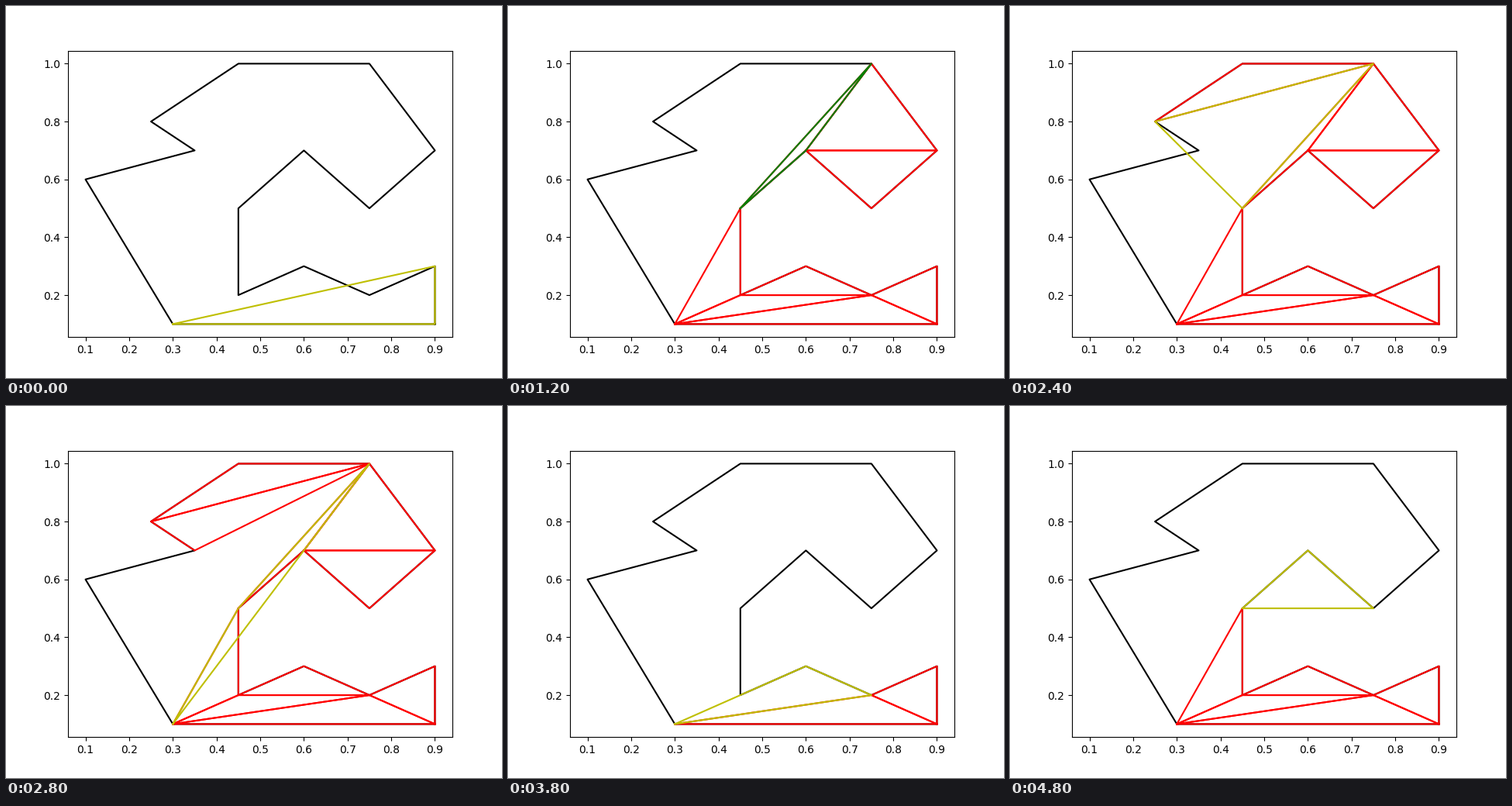
Animation, 640 px wide and 480 px high, one loop 5 s. Source, as a matplotlib script:

```python
import matplotlib.pyplot as plt
from matplotlib.animation import FuncAnimation

EPS = 1e-9


def make_outline():
    """Two zigzag jaws, closed by a few points along the top and left."""
    lower = [(.9 - .15 * i, .3 - .1 * (i % 2)) for i in range(4)]
    upper = [(.45 + .15 * i, .5 + .2 * (i % 2)) for i in range(4)]
    back = [(.75, 1), (.45, 1), (.25, .8), (.35, .7), (.1, .6), (.3, .1)]
    return [(.9, .1)] + lower + upper + back


def cross(a, b, c):
    return (b[0] - a[0]) * (c[1] - b[1]) - (b[1] - a[1]) * (c[0] - b[0])


def is_ear(a, b, c, polygon):
    if cross(a, b, c) <= EPS:
        return False
    if abs(a[0] - c[0]) < EPS:  # vertical diagonals are skipped
        return False
    others = (p for p in polygon if p not in (a, b, c))
    return not any(min(cross(a, b, p), cross(b, c, p), cross(c, a, p)) >= -EPS
                   for p in others)


def clip_ears(outline):
    """Return one (clipped triangles, candidate, color) per tested corner."""
    polygon, clipped, steps = list(outline), [], []
    while len(polygon) >= 3:
        for i, corner in enumerate(polygon):
            triangle = polygon[i - 1], corner, polygon[(i + 1) % len(polygon)]
            ear = is_ear(*triangle, polygon)
            if ear:
                clipped.append(triangle)
            steps.append((list(clipped), triangle, 'g' if ear else 'y'))
            if ear:
                del polygon[i]
                break
        else:
            break
    return steps


OUTLINE = make_outline()
STEPS = clip_ears(OUTLINE)
# Steps play in the alphabetical order of their numbers: 1, 10, 11, ..., 2, 20, ...
ORDER = sorted(range(1, len(STEPS) + 1), key=str)

fig, ax = plt.subplots(figsize=(6.4, 4.8), dpi=100)


def plot_closed(points, color):
    xs, ys = zip(*points, points[0])
    ax.plot(xs, ys, color=color, lw=1.5)


def draw(frame):
    clipped, candidate, color = STEPS[ORDER[frame] - 1]
    ax.clear()
    plot_closed(OUTLINE, 'k')
    for triangle in clipped:
        plot_closed(triangle, 'r')
    plot_closed(candidate, color)
    return ax.lines


anim = FuncAnimation(fig, draw, frames=len(STEPS), interval=200,
                     repeat=True, repeat_delay=0, init_func=lambda: draw(0))
plt.show()
```
